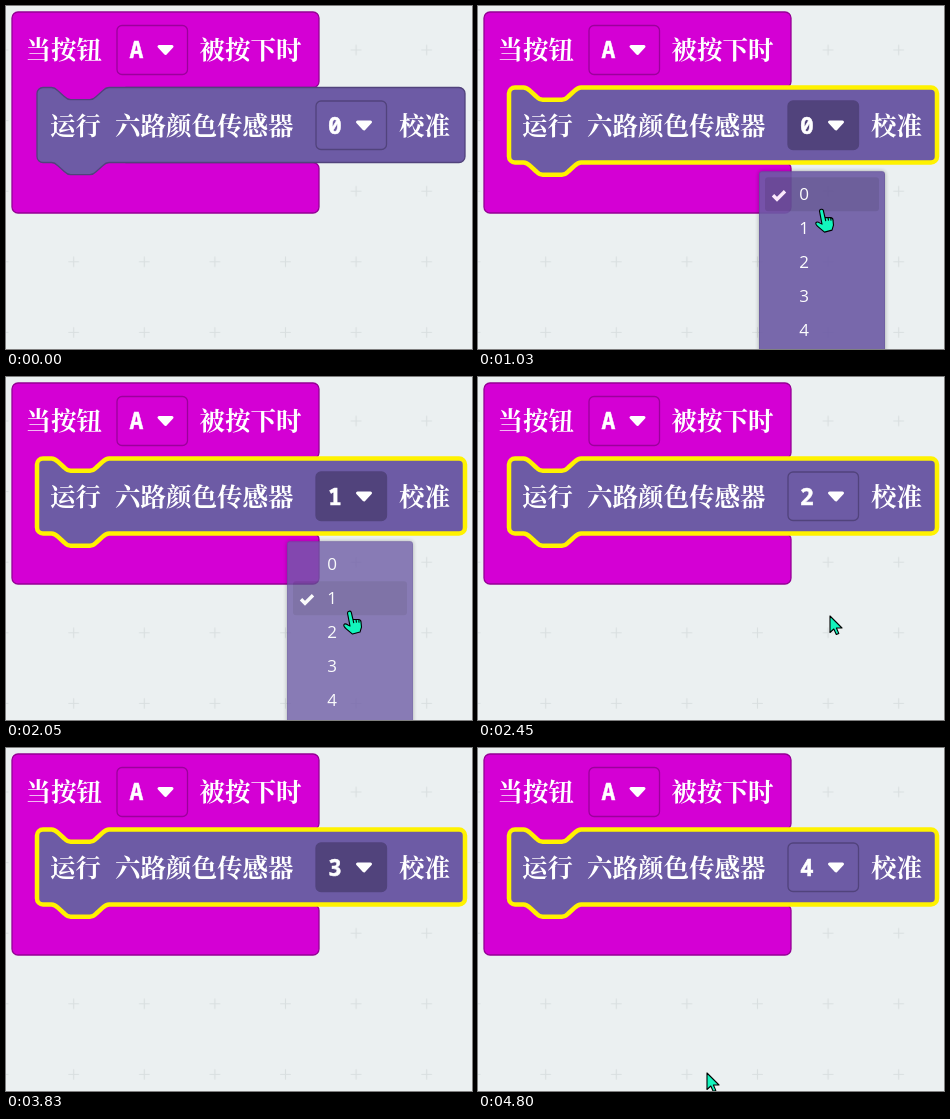
Write an HTML page that moves like this. It is 466 px wide and 343 px high and loops after 4840 ms.

```html
<!DOCTYPE html>
<html lang="zh-CN">
<meta charset="utf-8">
<style>
  html, body { margin: 0; width: 100%; height: 100%; overflow: hidden; background: #ebf0f1; }
  svg { display: block; }
  .label { font: bold 25.5px "Noto Serif CJK SC", "Noto Sans CJK SC", "Noto Sans CJK", serif; fill: #fff; }
  .value { font: bold 23px "Noto Sans Mono", monospace; fill: #fff; stroke: #fff; stroke-width: .5; text-anchor: middle; }
  #rows { font: 500 17px "Open Sans", "Noto Sans", sans-serif; fill: #fff; text-anchor: middle; }
  .caret { fill: #fff; stroke: #fff; stroke-width: 3; stroke-linejoin: round; }
  .cursor { fill: #12f5bd; stroke: #000; stroke-width: 1.1; stroke-linejoin: round; }
  #menu { filter: drop-shadow(0 0 2px rgba(0, 0, 0, .35)); }
</style>
<svg width="466" height="343" viewBox="0 0 466 343">
  <defs>
    <pattern id="grid" x="32.4" y="8.7" width="70.6" height="70.6" patternUnits="userSpaceOnUse">
      <path d="M30 35.3h10.6M35.3 30v10.6" stroke="#d9dfe0" stroke-width="1.2"/>
    </pattern>
  </defs>
  <rect width="466" height="343" fill="url(#grid)"/>

  <path fill="#d400d4" stroke="#950095" stroke-width="1.3" d="M12 6H307a6 6 0 0 1 6 6V75.500a6 6 0 0 1-6 6H120V156.500H307a6 6 0 0 1 6 6V201a6 6 0 0 1-6 6H12a6 6 0 0 1-6-6V12a6 6 0 0 1 6-6Z"/>
  <text class="label" x="19.500" y="53">当按钮</text>
  <rect x="111" y="19.500" width="70.500" height="49" rx="5" fill="none" stroke="#9c009c" stroke-width="1.3"/>
  <text class="value" x="130.500" y="52">A</text>
  <path class="caret" d="M153 40.500h13l-6.500 7Z"/>
  <text class="label" x="193.500" y="53">被按下时</text>

  <path id="block" fill="#6d5ba5" stroke-linejoin="round"/>
  <text class="label" x="44" y="128.500">运行</text>
  <text class="label" x="109" y="128.500">六路颜色传感器</text>
  <rect id="field" x="310" y="95" width="70.500" height="48.500" rx="5" stroke="#51437c" stroke-width="1.3"/>
  <text id="value" class="value" x="329" y="128"></text>
  <path class="caret" d="M351.500 116h13l-6.500 7Z"/>
  <text class="label" x="393" y="128.500">校准</text>

  <g id="menu">
    <rect x="281.500" y=".5" width="125" height="220" rx="2" fill="#6d5ba5" stroke="#63529a"/>
    <rect id="hover" x="287" width="114" height="34" rx="3" fill="#000" opacity=".11"/>
    <path id="check" d="M295 23l4 4 8-8" fill="none" stroke="#fff" stroke-width="3.4"/>
    <g id="rows"></g>
  </g>
  <path id="arrow" class="cursor" d="M0 0V16.500L3.800 13 6.300 18.500 8.800 17.400 6.400 12H12Z"/>
  <path id="hand" class="cursor" d="M-3 1.500a2 2 0 0 1 3.800-.8L2.500 8H8q2.500.3 2.500 2.500l.5 5-1.500 5-7.500 2-6-5q-3.500-3-2.500-4.500t4 .5l2 1ZM2.500 8l.8 3.500M5.500 8l.5 3M8.200 8.500l.4 2.500"/>
</svg>
<script>
const LOOP = 4840, ROW = 34, FRAME = 40;
const $ = id => document.getElementById(id);
const clamp = v => Math.max(0, Math.min(1, v));
const mix = (a, b, p) => a + (b - a) * p;

// One entry per choice: menu opens, pointer settles, row is clicked, pointer leaves
const picks = [
  { open: 870, fade: 870, rest: 1310, pick: 1560, leave: 1640, step: 80, from: [347, 192], to: [347, 120] },
  { open: 1930, fade: 1930, rest: 2250, pick: 2450, leave: 2530, step: 40, from: [352, 239], to: [348, 130] },
  { open: 2860, fade: 2840, rest: 3140, pick: 3340, leave: 3500, step: 40, from: [350, 284], to: [346, 130] },
  { open: 3830, fade: 3875, rest: 4310, pick: 4560, leave: LOOP, step: 60, from: [345, 325], to: [229, 325], travel: 240 }
];

const notch = 'c3.2 0 4.8 1.6 6.4 3.2l6.4 5.800c1.6 1.6 3.2 3.2 6.4 3.2h19.2c3.2 0 4.8-1.6 6.4-3.2l6.4-5.800c1.6-1.6 3.2-3.2 6.4-3.2';
const notchBack = 'c-3.2 0-4.8 1.6-6.4 3.2l-6.4 5.800c-1.6 1.6-3.2 3.2-6.4 3.2h-19.2c-3.2 0-4.8-1.6-6.4-3.2l-6.4-5.800c-1.6-1.6-3.2-3.2-6.4-3.2';
$('block').setAttribute('d', `M37 81.5H45.500${notch}H453a6 6 0 0 1 6 6V150.500a6 6 0 0 1-6 6H103.100${notchBack}H37a6 6 0 0 1-6-6V87.500a6 6 0 0 1 6-6Z`);
$('rows').innerHTML = [0, 1, 2, 3, 4].map(n => `<text x="326" y="${29 + n * ROW}">${n}</text>`).join('');

function set(id, attrs) {
  for (const key in attrs) $(id).setAttribute(key, attrs[key]);
}

function place(id, point) {
  set(id, point ? { display: 'inline', transform: `translate(${point})` } : { display: 'none' });
}

// CSS "ease" timing curve
function ease(x) {
  let lo = 0, hi = 1;
  const bezier = (a, b, s) => 3 * a * s * (1 - s) ** 2 + 3 * b * s * s * (1 - s) + s ** 3;
  for (let i = 0; i < 16; i++) {
    const mid = (lo + hi) / 2;
    if (bezier(.25, .25, mid) < x) lo = mid; else hi = mid;
  }
  return bezier(.1, 1, lo);
}

function draw(t) {
  const value = picks.filter(p => t >= p.pick).length;
  const active = picks.findIndex(p => t >= p.open && t < p.pick);
  const selected = t >= 790;
  let hand = null, arrow = null;

  set('block', { stroke: selected ? '#fff200' : '#51437c', 'stroke-width': selected ? 4.5 : 1.3 });
  set('field', { fill: active < 0 ? 'none' : '#51437c' });
  $('value').textContent = value;

  let opacity = 0;
  if (active >= 0) {
    const p = picks[active];
    const now = p.open + Math.floor((t - p.open) / FRAME) * FRAME;
    opacity = now < p.open + (p.fade > p.open ? 80 : 0) ? 0 : ease(clamp((now - p.fade) / 250));
    const top = mix(158, 166, opacity);
    const progress = clamp((now - p.open) / (p.rest - p.open));
    const y = mix(110, 222 + active * 35, 1 - (1 - progress) ** 4);
    const inside = y > top && opacity > 0;
    if (inside) hand = [344.5, y];
    const row = inside ? Math.max(0, Math.min(4, Math.floor((y - top - 6) / ROW))) : value;
    set('menu', { transform: `translate(0 ${top})` });
    set('hover', { y: 6 + row * ROW });
    set('check', { transform: `translate(0 ${(value - 2) * ROW + 69})` });
  }
  set('menu', { opacity, display: opacity ? 'inline' : 'none' });

  const leaving = picks.find(p => t >= p.pick && t < p.leave);
  if (leaving) {
    const { pick, leave, step, from, to, travel = leave - pick } = leaving;
    const progress = clamp(Math.floor((t - pick) / step) * step / travel);
    arrow = from.map((v, i) => mix(v, to[i], progress));
    if (arrow[1] < 157) arrow = null;
  }
  place('hand', hand);
  place('arrow', arrow);
}

const start = performance.now();
(function tick() {
  draw((performance.now() - start) % LOOP);
  requestAnimationFrame(tick);
})();
</script>
</html>
```
